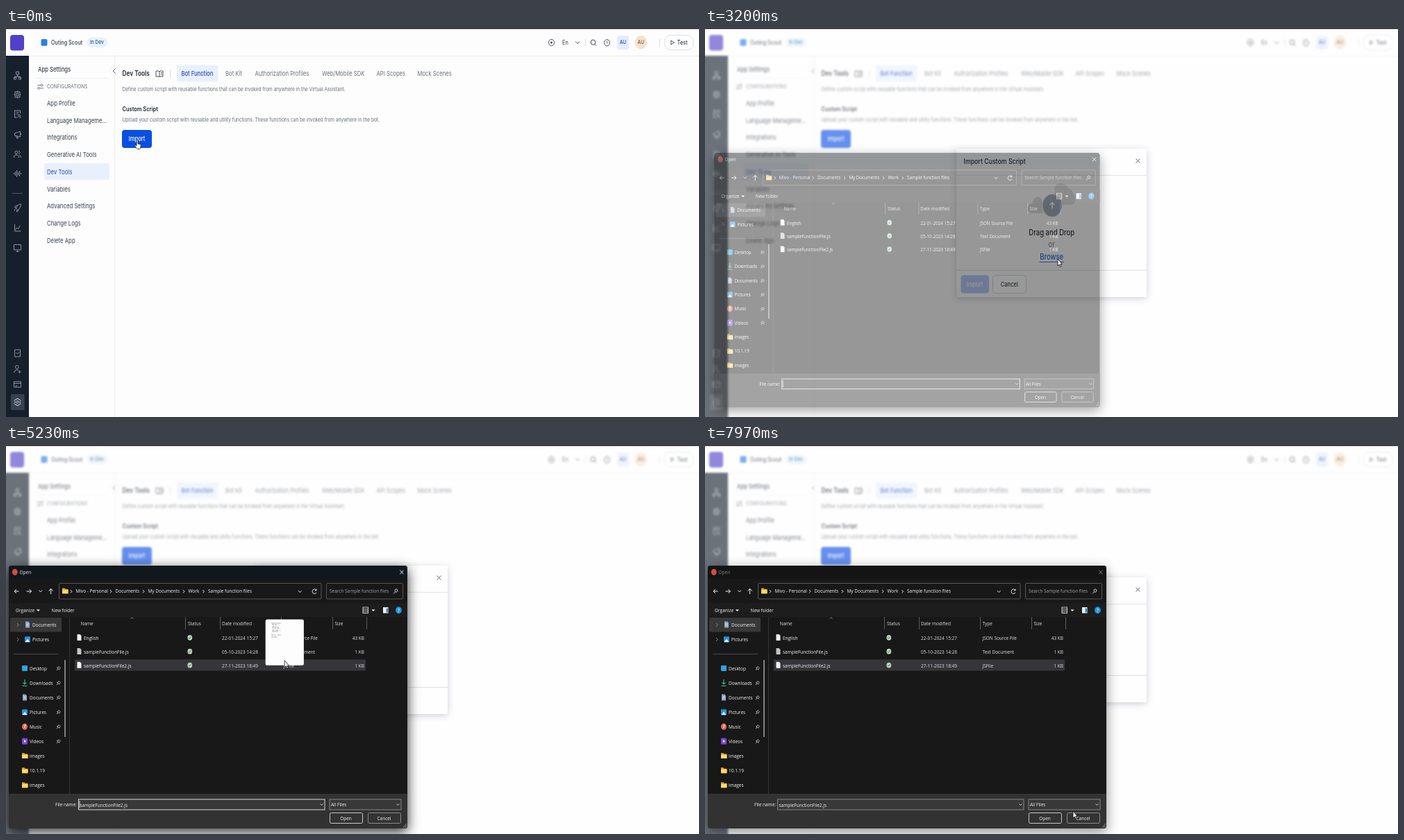
These frames come from a looping animation (998 px wide and 561 px high, 8 s). An HTML page:

```html
<!DOCTYPE html>
<html lang="en">
<head>
<meta charset="utf-8">
<title>Import custom script</title>
<style>
html, body { margin: 0; width: 100%; height: 100%; overflow: hidden; background: #fdfdfd; }
svg { display: block; width: 100vw; height: 100vh; font-family: Inter, sans-serif; }
#dialog { font-family: "Open Sans", "Noto Sans", sans-serif; }
text { white-space: pre; }
</style>
</head>
<body>
<svg id="stage" viewBox="0 0 998 561" preserveAspectRatio="none"></svg>
<script>
const LOOP = 8000;
const SQUEEZE = 0.82;

// Drawing helpers. Text is placed by its left edge and visual centre.
const text = (x, y, str, size, fill, weight = 400, anchor = 'start') =>
  `<text transform="translate(${x} ${y + size * 0.36}) scale(${SQUEEZE} 1)" font-size="${size}" fill="${fill}" font-weight="${weight}" text-anchor="${anchor}">${str}</text>`;
const box = (x1, y1, x2, y2, fill, r = 0, stroke = 'none', more = '') =>
  `<rect x="${x1}" y="${y1}" width="${x2 - x1}" height="${y2 - y1}" rx="${r}" fill="${fill}" stroke="${stroke}" ${more}/>`;
const line = (d, stroke, width = 1, more = '') =>
  `<path d="${d}" fill="none" stroke="${stroke}" stroke-width="${width}" ${more}/>`;
const shape = (d, fill) => `<path d="${d}" fill="${fill}"/>`;
const oval = (x, y, rx, ry, fill, stroke = 'none') =>
  `<ellipse cx="${x}" cy="${y}" rx="${rx}" ry="${ry}" fill="${fill}" stroke="${stroke}"/>`;
const at = (x, y, body, id = '') => `<g ${id && `id="${id}"`} transform="translate(${x} ${y})">${body}</g>`;

const circle = 'M-4 0A4 4.6 0 0 1 4 0A4 4.6 0 0 1-4 0Z';
const RAIL = [
  [68, 'M-2-5H2V-1H-2ZM0-1V2M-4 4V2H4V4M-5 3H-2V6H-5ZM2 3H5V6H2Z'],
  [96, 'M-3.5-4H3.5V4H-3.5ZM-1.5-2H1.5V2H-1.5ZM-5 0H-3.5M3.5 0H5M0-5.5V-4M0 4V5.5'],
  [124, 'M4-1V-5H-4V5H0M-2-2.5H2M-2 0H1M1 2.5a1.5 1.5 0 1 0 3 0a1.5 1.5 0 1 0-3 0M3.5 4L5 6'],
  [154, 'M-4-2L4-5V3L-4 1ZM-2 2L-1 5H1L0 2M5-2V0'],
  [182, 'M-3.5-2.5a2 2.3 0 1 0 4 0a2 2.3 0 1 0-4 0M-5 5V3Q-4 1-1.5 1T2 3V5M2-5Q5-2.5 2 0M3 1.5Q5 2 5 5'],
  [210, 'M-5-1V1M-3-3V3M-1-5V5M1-2.5V2.5M3-4V4M5-1V1'],
  [259, 'M-2 1Q0-5 5-5Q5 1 0 4ZM-2 0H-4L-2-3H0M1 3V5L-1 6V4M-3 2L-5 5'],
  [288, 'M-4-5V5H5M-3 3L-1 0L1 1.5L4-3'],
  [317, 'M-5-4.5H5V3H-5ZM-2 5.5H2M0 3V5'],
  [469, 'M-4-5H4V5H-4ZM-2-1L0 1L3-2'],
  [492, 'M-3-3a2.3 2.5 0 1 0 4.6 0a2.3 2.5 0 1 0-4.6 0M-5 5Q-4 1-1 1Q1 1 2 2M3 2V6M1 4H5'],
  [514, 'M-5-4H5V4H-5ZM-5-1.5H5M-3 2H0'],
];
const gear = 'M-1-5H1L1.5-3.5L3-4L4.5-2L3.5-.8V.8L4.5 2L3 4L1.5 3.5L1 5H-1L-1.5 3.5L-3 4L-4.5 2L-3.5 .8V-.8L-4.5-2L-3-4L-1.5-3.5ZM-1.5 0a1.5 1.7 0 1 0 3 0a1.5 1.7 0 1 0-3 0';

function page() {
  const ink = '#39414e', soft = '#69717d', navy = '#2249bd', tint = '#e9f0fd';
  let s = box(-12, -12, 1010, 573, '#fdfdfd');
  s += line('M33 40.5H1010', '#e8e9ec') + line('M156.5 40V573', '#ececee') + line('M42 72.5H148', '#eceef0', 0.8);
  s += box(-12, 40, 33, 573, '#16202c') + box(7, 528, 26.5, 551, '#364150', 2);
  s += RAIL.map(([y, d]) => at(16.5, y, line(d, '#98a2ae', 0.9))).join('');
  s += at(16.5, 539.5, line(gear, '#d5dae0', 0.9)) + line('M9 238.5H24', '#4d5865');
  s += box(6, 10, 26, 32.5, '#5140c8', 4);

  // top bar
  s += box(50.5, 16, 59.5, 25.7, '#2a80e4', 1.8) + text(65, 21, 'Outing Scout', 8.9, ink, 500);
  s += box(116.5, 13.5, 146, 28, '#e6f2fd', 7) + text(121, 20.5, 'In Dev', 8, '#245a86', 500);
  s += at(785.5, 21, line(circle, ink, 0.9) + oval(0, 0, 1.4, 1.6, ink));
  s += text(801, 21, 'En', 9, ink) + line('M820 19.5L823 22.5L826 19.5', ink, 0.9);
  s += line('M834.5 16V26M941.5 16V26', '#dadde2');
  s += line('M842.3 20.6a3.2 3.6 0 1 0 6.4 0a3.2 3.6 0 1 0-6.4 0M847.8 23.3L850 25.5', ink, 1);
  s += at(865.5, 21.3, line(circle, ink, 0.9)) + text(865.5, 21.3, '?', 6.5, ink, 500, 'middle');
  s += box(880, 11, 897, 31, '#e4ecfd', 3) + text(888.5, 20.5, 'AU', 8, navy, 500, 'middle');
  s += oval(914.3, 20.7, 8.8, 10, '#f8e2cd') + text(914.3, 20.5, 'AU', 8, '#6d5a48', 500, 'middle');
  s += box(948.5, 10.5, 990, 31.5, '#fff', 9, '#dcdfe4') + line('M957.8 18L962.2 21L957.8 24Z', ink, 0.9);
  s += text(966.5, 21, 'Test', 9, ink, 500);

  // settings menu
  s += text(46, 60, 'App Settings', 9.4, ink, 500);
  s += line('M45 82.5H50M53 82.5H54M45 86.8H46M49 86.8H54M50 82.5a1.4 1.5 0 1 0 2.8 0a1.4 1.5 0 1 0-2.8 0M46 86.8a1.4 1.5 0 1 0 2.8 0a1.4 1.5 0 1 0-2.8 0', soft, 0.9);
  s += text(59, 84, 'CONFIGURATIONS', 8, soft);
  s += box(55, 195, 149, 219, tint, 2);
  s += ['App Profile', 'Language Manageme...', 'Integrations', 'Generative AI Tools', 'Dev Tools', 'Variables',
    'Advanced Settings', 'Change Logs', 'Delete App']
    .map((name, i) => text(59, 108.3 + i * 24.78, name, 9.5, i === 4 ? navy : ink)).join('');
  s += oval(156, 62, 6, 7, '#fff', '#f0f0f2') + line('M157.5 58.5L154.3 62L157.5 65.5', ink, 0.9);

  // content
  s += text(167.5, 65.5, 'Dev Tools', 10.1, '#1f2733', 600) + line('M236.5 60V71', '#d8dbe0');
  s += line('M216 62H220L221 63L222 62H226V70H222L221 70.5L220 70H216ZM221 63V70M223 64.5H225M223 67H225', ink, 0.9);
  s += box(246, 53.5, 305.5, 77.5, tint, 3) + text(252.5, 65.5, 'Bot Function', 9.3, navy, 500);
  [[316, 'Bot Kit'], [358.5, 'Authorization Profiles'], [455, 'Web/Mobile SDK'], [533.5, 'API Scopes'], [592.5, 'Mock Scenes']]
    .forEach(([x, name]) => s += text(x, 65.5, name, 9.4, soft));
  s += text(167.5, 87.8, 'Define custom script with reusable functions that can be invoked from anywhere in the Virtual Assistant.', 7.98, soft);
  s += text(167.5, 117, 'Custom Script', 9.1, '#1f2733', 600);
  s += text(167.5, 132.3, 'Upload your custom script with reusable and utility functions. These functions can be invoked from anywhere in the bot.', 7.98, soft);
  s += box(167, 147, 210, 173, '#0b4fe2', 4) + text(188.5, 159.3, 'Import', 9.2, '#fff', 500, 'middle');
  return s;
}

// Modal parts are measured from its top edge; the foot moves with the height.
function modal() {
  const ink = '#232a35', blue = '#1768dc';
  const cloud = shape('M470 93Q464.5 92 465 85.5Q466 79 471.5 79.5Q473 69 480 69.5Q486 71 486.5 79V93Z', '#dcdcde')
    + shape('M506 81Q501 79 502 71Q502 66 504 64Q501 51 512 50Q521 50 523 58Q530 58 530 65Q534 68 533 75Q532 81 526 81Z', '#e2e2e5')
    + oval(500, 82, 14.2, 16.8, '#9ea8b5', '#fff') + line('M500 86.5V78M496.8 81.3L500 77.8L503.2 81.3', '#fff', 1.6);
  return `<rect id="card" x="362" y="0" width="274" height="177" rx="2.5" fill="#fefefe" filter="url(#soft)"/>`
    + text(372.5, 18.5, 'Import Custom Script', 10.7, ink, 500)
    + line('M620.7 14.5L626.3 20.5M626.3 14.5L620.7 20.5', '#4b5360', 0.9)
    + line('M362 38.5H636', '#e2e4e8')
    + `<g id="cloud">${cloud}</g>`
    + at(0, 0, text(499.2, 83.5, 'Drag and Drop', 11.6, ink, 500, 'middle') + text(499.2, 101, 'or', 11.6, '#737a85', 400, 'middle')
      + text(499.2, 119, 'Browse', 11.6, blue, 500, 'middle') + line('M481.5 126.5H517', blue, 0.9)
      + line('M362 138.5H636', '#dfe1e5')
      + box(368.5, 145.5, 409, 171.5, '#b1c8fa', 4) + text(388.5, 158.5, 'Import', 9.2, '#fff', 500, 'middle')
      + box(414.5, 145.5, 462.5, 171.5, '#fff', 4, '#d3d7dd') + text(438.3, 158.5, 'Cancel', 9.2, '#333b47', 500, 'middle'), 'foot');
}

const doc = (x, y, fill) => shape(`M${x - 3} ${y - 4.5}h4l2 2v7h-6z`, fill);
const folder = (x, y) => shape(`M${x - 4} ${y - 4}h3.5l1 1.3h4v6.5h-8.5z`, '#e0a92a') + box(x - 4, y - 1.5, x + 4.5, y + 3.8, '#ffd866', 0.6);
const ICONS = {
  Desktop: (x, y) => box(x - 4, y - 4, x + 4, y + 4, '#2ba5dc', 1),
  Downloads: (x, y) => line(`M${x} ${y - 5}v7m-2.5-2.5l2.5 2.5l2.5-2.5M${x - 3.5} ${y + 4.5}h7`, '#3fc08f', 1.1),
  Documents: (x, y) => doc(x, y, '#8fa9c4') + line(`M${x - 1.5} ${y - 1}h3m-3 2h3`, '#fff', 0.7),
  Pictures: (x, y) => box(x - 4, y - 4, x + 4, y + 4, '#2196dc', 1) + shape(`M${x - 3.5} ${y + 4}l3.5-4.5l3.5 4.5z`, '#e8f5ff'),
  Music: (x, y) => oval(x, y, 4, 4.6, '#dc6a5c') + line(`M${x} ${y + 2}v-4.5l1.8 1`, '#fff', 0.9),
  Videos: (x, y) => box(x - 4, y - 4.5, x + 4, y + 4.5, '#7c46d8', 1) + shape(`M${x - 1} ${y - 2}l3 2l-3 2z`, '#fff'),
};

function dialog() {
  const pale = '#f4f4f4', dim = '#a0a0a0', edge = '#565656';
  const label = (x, y, str, fill = pale, anchor) => text(x, y - 0.4, str, 7.9, fill, 500, anchor);
  let s = box(4, 174, 578, 553, '#000', 4, 'none', 'id="shade" filter="url(#deep)"') + box(4, 174, 578, 553, '#181818', 4);
  s += `<path id="bar" d="M4 193V178Q4 174 8 174H574Q578 174 578 178V193Z"/>`;
  s += box(4, 228, 578, 248, '#1d1d1d') + shape('M4 503H578V549Q578 553 574 553H8Q4 553 4 549Z', '#323232');
  s += oval(12.8, 183.3, 3.9, 4.6, '#d84c3e');
  s += `<g id="heading">${label(19.5, 183.8, 'Open')}${line('M567.2 180.5L572.6 186.3M572.6 180.5L567.2 186.3', '#fff', 0.9)}</g>`;

  // navigation row
  s += box(76.5, 199.5, 454, 222, '#181818', 1, edge) + box(461.5, 199.5, 571.5, 222, '#181818', 1, edge);
  s += line('M18.5 211H12M15 208L12 211L15 214M29.5 211H36.5M33.5 208L36.5 211L33.5 214M64.7 215V207.5M61.7 210.5L64.7 207.2L67.7 210.5', pale, 1);
  s += line('M47.5 209.5L49.7 212L52 209.5M421 210L423.3 212.5L425.6 210', pale, 0.9);
  s += folder(85, 210.5);
  [[100.5, 'Mivo - Personal'], [157.5, 'Documents'], [204.5, 'My Documents'], [262.5, 'Work'], [291, 'Sample function files']]
    .forEach(([x, name]) => s += label(x, 211, name) + line(`M${x - 7.5} 209l2 2.2l-2 2.2`, pale, 0.9));
  s += line('M446.7 209.3A3 3.4 0 1 0 447 212.5M447 207.5V209.8H444.7', pale, 0.9);
  s += label(466, 211, 'Search Sample function files', dim);
  s += line('M560 210a1.9 2.2 0 1 0 3.8 0a1.9 2.2 0 1 0-3.8 0M560.5 211.7L558 214.5', pale, 0.8);

  // command row
  s += label(14, 238.7, 'Organize') + label(65.5, 238.7, 'New folder') + shape('M44 237.3h5l-2.5 2.8zM526.5 237.3h5l-2.5 2.8z', pale);
  s += box(514, 234, 521.5, 242.5, 'none', 0, pale, 'stroke-width=".8"') + line('M514 236.5H521.5M514 238.5H521.5M514 240.5H521.5', pale, 0.6);
  s += box(543, 234, 550.5, 242.5, '#f0f0f0') + box(547.5, 235.5, 550, 241.5, '#2a8fd0') + oval(565.5, 238.3, 4.4, 5, '#2097dd') + text(565.5, 238.3, '?', 7, '#fff', 600, 'middle');

  // folder tree
  s += box(6, 249, 80, 269.5, '#383838', 1) + line('M16 257l2.3 2.5l-2.3 2.5M16 278l2.3 2.5l-2.3 2.5', dim, 0.8);
  s += ICONS.Documents(31, 259) + label(38, 259.3, 'Documents') + ICONS.Pictures(31, 280.3) + label(38, 280.5, 'Pictures');
  s += line('M11 301.5H76', '#4a4a4a') + line('M91.5 248V503', '#333') + line('M85 310V421', '#a5a5a5', 1.5);
  Object.keys(ICONS).concat('images', '10.1.19', 'images').forEach((name, i) => {
    const y = 322 + i * 21.05, icon = ICONS[name];
    s += (icon || folder)(27, y) + label(34, y + 0.3, name);
    if (icon) s += line(`M73 ${y + 3}l2-2.2m-1.8-1.8l4 3.3m-3-2.3l2-2.5l2 2l-1.5 2.2`, '#b5b5b5', 1);
  });

  // file list
  s += line('M179.5 250.5L181.5 248.8L183.5 250.5', dim, 0.8);
  s += line('M258.5 248V266M308.5 248V266M396.5 248V266M470.5 248V266M519.5 248V266', '#5a5a5a');
  [[107.5, 'Name'], [262, 'Status'], [311, 'Date modified'], [399.5, 'Type'], [473.5, 'Size']]
    .forEach(([x, name]) => s += label(x, 257.5, name, '#dedede'));
  s += box(99, 309.3, 518, 325.6, 'none', 0, 'none', 'id="row"');
  [['English', '22-01-2024 15:27', 'JSON Source File', '43 KB'],
   ['sampleFunctionFile.js', '05-10-2023 14:28', 'Text Document', '1 KB'],
   ['sampleFunctionFile2.js', '27-11-2023 18:49', 'JSFile', '1 KB']].forEach(([name, date, type, size], i) => {
    const y = 278.3 + i * 19.9;
    s += doc(105.5, y - 0.8, i === 1 ? '#c4c4c4' : '#f2f2f2') + label(112, y + 0.2, name);
    s += oval(264.8, y - 0.5, 3.4, 3.9, '#b7d6b9') + line(`M263.2 ${y - 0.5}l1.2 1.4l2-2.6`, '#2c6b35', 0.9);
    s += label(311, y + 0.2, date, '#e4e4e4') + label(399.5, y + 0.2, type, '#e4e4e4') + label(516, y + 0.2, size, '#e4e4e4', 'end');
  });

  // footer
  s += label(102, 518.7, 'File name:', pale, 'end');
  s += box(104.5, 511, 459, 526, '#383838', 0, '#8a8a8a', 'id="field"') + box(466, 511, 569, 526, '#383838', 0, '#858585');
  s += `<g id="chosen">${label(106.5, 519.2, 'sampleFunctionFile2.js')}</g>` + line('M106 513.5V523.5', '#fff', 0.8, 'id="caret"');
  s += label(468, 518.9, 'All Files') + line('M452.5 517.5L454.5 519.5L456.5 517.5M562.5 517.5L564.5 519.5L566.5 517.5', pale, 0.8);
  s += box(466.5, 530.5, 513.5, 545.5, '#333', 2, '#c8c8c8') + label(489.5, 538.5, 'Open', pale, 'middle');
  s += box(521.5, 530.5, 568.5, 545.5, '#333', 2, '#8c8c8c') + label(544.5, 538.5, 'Cancel', pale, 'middle');
  return s + line('M572 552L577 546M574.5 552L577 549', '#aaa', 0.8);
}

function thumb() {
  const code = ['function trip(a) {', '  var day = 1;', '  var list = [];', '  list.push(a);', '  day = day + 1;', '  return list;', '}', 'var out = trip(2);', 'print(out);'];
  return box(-27.5, -59.3, 27.7, 7, '#fdfdfd', 2.5)
    + code.map((row, i) => text(-19, -54 + i * 2.5, row, 2.3, '#777')).join('');
}

const arrow = '<path d="M0 0V10L2.2 8L3.7 11.5L5.2 10.8L3.7 7.4H6.3Z" fill="#fff" stroke="#111" stroke-width=".8"/>';
const hand = '<path d="M-.5 1.5c0-1.5 2-1.5 2 0V6l2.8 .6c1.2 .3 1.6 .9 1.4 2l-.6 3.4c-.2 1-.5 1.5-1.2 1.5H1c-.7 0-1-.3-1.4-.9L-2.9 9c-.5-1 .5-1.6 1.2-1l1.2 1z" fill="#fff" stroke="#111" stroke-width=".8"/>';

const stage = document.getElementById('stage');
stage.innerHTML = `<defs>
  <filter id="soft" x="-20%" y="-20%" width="140%" height="140%"><feDropShadow dx="0" dy="2" stdDeviation="5" flood-color="#4a5078" flood-opacity=".28"/></filter>
  <filter id="deep" x="-10%" y="-15%" width="120%" height="130%"><feOffset dy="5"/><feGaussianBlur stdDeviation="9"/></filter>
</defs>
<g id="page">${page()}</g>
<rect id="veil" width="998" height="561" fill="#fff"/>
${box(0, 0, 998, 1.4, '#15171a')}
<g id="modal">${modal()}</g>
<g id="dialog">${dialog()}</g>
<g id="thumb">${thumb()}</g>
<g id="pointer"><g id="arrow">${arrow}</g><g id="hand">${hand}</g></g>`;
const ui = {};
stage.querySelectorAll('[id]').forEach(el => ui[el.id] = el);

// Moments of the story, in ms
const OPEN = 925, GROW = 1130, PICKER = 3150, HOVER = 3500, SELECT = 4550, DRAG = 4720, DROP = 5950;
// The file is picked up by its name and carried onto the modal.
const PATH = [[0, 188.5, 161], [1300, 188.5, 161], [2050, 508, 333], [3300, 508, 333], [3650, 486.5, 322],
  [3900, 486.5, 322], [4450, 145, 317.5], [4650, 145, 317.5], [5725, 602, 305.5], [7000, 602, 305.5], [7900, 530, 528], [LOOP + 1, 530, 528]];

const part = (t, from, length) => Math.min(1, Math.max(0, (t - from) / length));
const smooth = p => p * p * (3 - 2 * p);
const show = (el, on) => el.setAttribute('visibility', on ? 'visible' : 'hidden');
const move = (el, x, y) => el.setAttribute('transform', `translate(${x} ${y})`);

function pointerAt(t) {
  const i = PATH.findIndex(k => k[0] > t), [t0, x0, y0] = PATH[i - 1], [t1, x1, y1] = PATH[i];
  const p = smooth((t - t0) / (t1 - t0));
  return [x0 + (x1 - x0) * p, y0 + (y1 - y0) * p];
}

let lastBlur = -1;
function draw(t) {
  const fade = part(t, OPEN, 180), blur = fade * 1.45;
  if (blur !== lastBlur) ui.page.style.filter = blur ? `blur(${blur}px)` : 'none';
  lastBlur = blur;
  ui.veil.setAttribute('opacity', fade * 0.37);

  const height = t < GROW ? 177 : t < DROP ? 214 : 180;
  const slide = -40 * (1 - part(t, OPEN, 300)) ** 2;
  move(ui.modal, 0, 281 - height / 2 + slide);
  ui.modal.setAttribute('opacity', part(t, OPEN, 150));
  ui.card.setAttribute('height', height);
  move(ui.foot, 0, height - 177);
  show(ui.cloud, t >= GROW && t < DROP);

  const p = 1 - (1 - part(t, PICKER, 200)) ** 2, zoom = 0.94 + 0.06 * p, active = t < DROP;
  ui.dialog.setAttribute('opacity', p);
  ui.dialog.setAttribute('transform', `translate(${291 * (1 - zoom)} ${363 * (1 - zoom)}) scale(${zoom})`);
  ui.shade.setAttribute('opacity', active ? 0.82 : 0.45);
  ui.bar.setAttribute('fill', active ? '#10181d' : '#141414');
  ui.heading.setAttribute('opacity', active ? 1 : 0.5);
  ui.row.setAttribute('fill', t < HOVER ? 'none' : t < SELECT ? '#4b4b4b' : '#35353a');
  ui.field.setAttribute('stroke', active ? '#d8d8d8' : '#858585');
  show(ui.caret, active);
  show(ui.chosen, t >= SELECT);

  const [x, y] = pointerAt(t);
  move(ui.pointer, x, y);
  show(ui.hand, t < OPEN);
  show(ui.arrow, t >= OPEN);
  move(ui.thumb, x, y);
  show(ui.thumb, t >= DRAG && t < DROP);
}

const start = performance.now();
function tick() {
  draw((performance.now() - start) % LOOP);
  requestAnimationFrame(tick);
}
tick();
</script>
</body>
</html>
```
